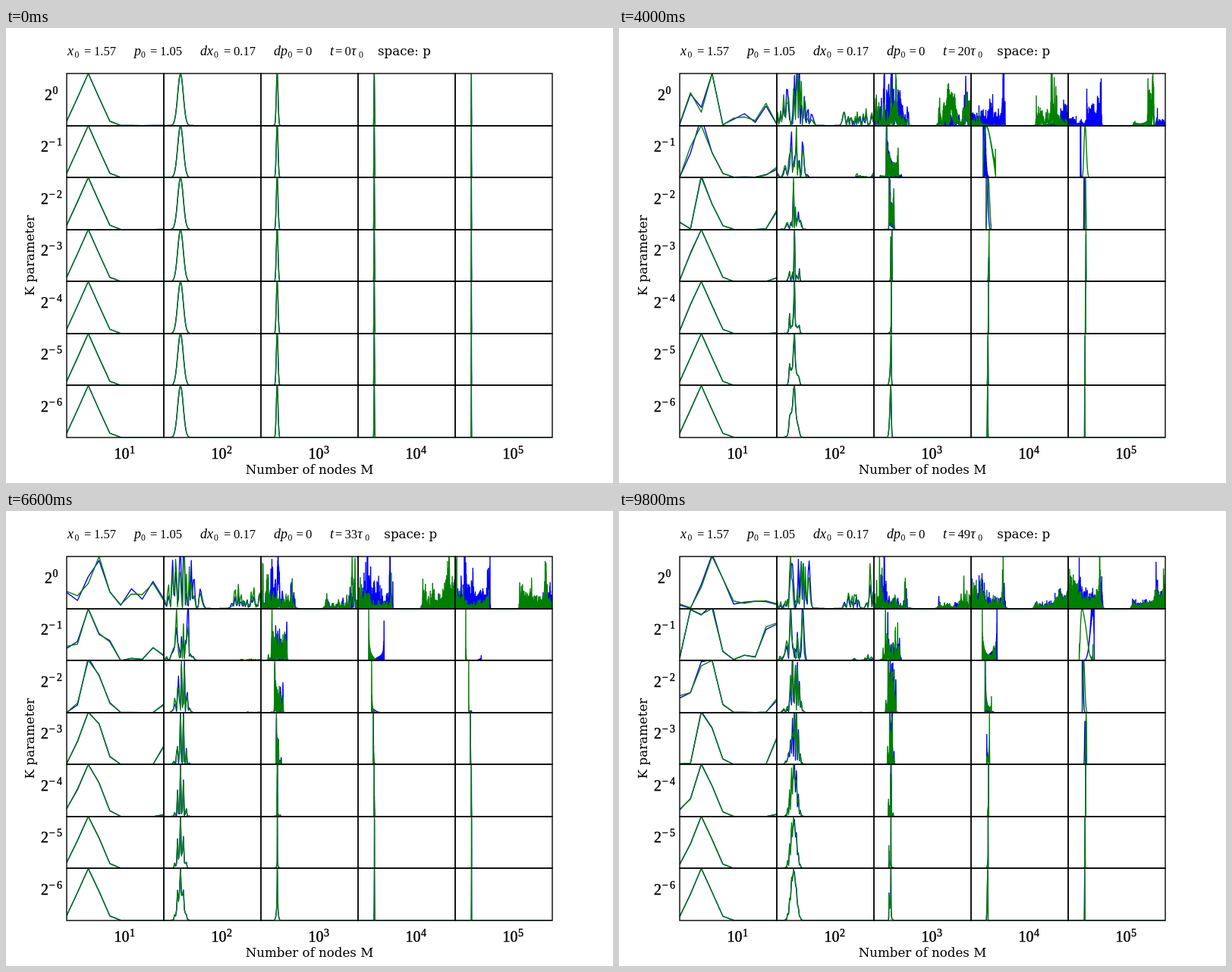
These frames come from a looping animation (800x600 px, 10000 ms). An HTML page with a canvas:

```html
<!DOCTYPE html>
<html lang="en">
<head>
<meta charset="utf-8">
<title>Kicked rotor in momentum space</title>
<style>
  html, body { margin: 0; width: 100%; height: 100%; overflow: hidden; background: #fff; }
  canvas, svg { position: absolute; left: 0; top: 0; width: 800px; height: 600px; }
  text { white-space: pre; }
  .label { font: 16.67px "DejaVu Serif", "Noto Serif", serif; }
  .math { font: 16.67px "Liberation Serif", "Times New Roman", serif; }
  .tick { font: 20px "Liberation Serif", "Times New Roman", serif; stroke: #000; stroke-width: .4px; }
  .math .sub { font-size: 11.67px; }
  .tick .sup { font-size: 14px; }
  .math .it { font-style: italic; font-size: 18px; }
</style>
</head>
<body>
<canvas id="plot" width="800" height="600"></canvas>
<svg id="texts" viewBox="0 0 800 600">
  <text class="label" x="400" y="588" text-anchor="middle">Number of nodes M</text>
  <text class="label" transform="translate(37 300) rotate(-90)" text-anchor="middle">K parameter</text>
</svg>
<script>
const STEP_MS = 200, STEPS = 50, ROWS = 7, COLS = 5;
const LEFT = 80, TOP = 60, CELL_W = 128, CELL_H = 480 / ROWS;
const START_X = Math.PI / 2, SHIFT_X = Math.PI / 18;
const TAU = 2 * Math.PI;
const mod = (a, n) => ((a % n) + n) % n;

// ---- labels ----
const svg = document.getElementById("texts");
function addText(cls, parts) {
  const text = document.createElementNS(svg.namespaceURI, "text");
  text.setAttribute("class", cls);
  const spans = parts.map(([x, y, value, kind = ""]) => {
    const span = document.createElementNS(svg.namespaceURI, "tspan");
    span.setAttribute("x", x);
    span.setAttribute("y", y);
    span.setAttribute("class", kind);
    span.textContent = value;
    text.append(span);
    return span;
  });
  svg.append(text);
  return spans;
}
function addQuantity(x, name, subX, equalX, valueX, value) {
  addText("math", [[x, 36, name, "it"], [subX, 38.5, "0", "sub"], [equalX, 36, "="], [valueX, 36, value]]);
}
addQuantity(81, "x", 90.5, 103, 116, "1.57");
addQuantity(169, "p", 178, 190, 203, "1.05");
addQuantity(256, "dx", 274, 287, 300, "0.17");
addQuantity(353, "dp", 371.5, 382.5, 395, "0");
const [, , stepText, tauText, tauSub] = addText("math", [
  [427, 36, "t", "it"], [434, 36, "="], [446.5, 36, "0"], [455, 36, "τ", "it"], [465, 38.5, "0", "sub"]]);
const [spaceText] = addText("label", [[490, 36, "space: p"]]);

for (let r = 0; r < ROWS; r++) {
  const y = 94.5 + r * CELL_H;
  addText("tick", r
    ? [[46, y, "2"], [57, y - 8, "−", "sup"], [67, y - 8, r, "sup"]]
    : [[51, y, "2"], [61.5, y - 8, "0", "sup"]]);
}
for (let c = 0; c < COLS; c++) {
  const x = 142.5 + c * CELL_W;
  addText("tick", [[x, 568, "10"], [x + 20.5, 560.5, c + 1, "sup"]]);
}

// ---- Fourier transforms: natural order -> bit-reversed order and back ----
const twiddles = {};
function twiddle(n) {
  return twiddles[n] ||= {
    c: Float64Array.from({ length: n / 2 }, (_, j) => Math.cos(TAU * j / n)),
    s: Float64Array.from({ length: n / 2 }, (_, j) => Math.sin(TAU * j / n))
  };
}
function toPosition(re, im) {
  const n = re.length, { c, s } = twiddle(n);
  for (let half = n / 2, stride = 1; half >= 1; half /= 2, stride *= 2) {
    for (let base = 0; base < n; base += 2 * half) {
      for (let a = base, k = 0; a < base + half; a++, k += stride) {
        const b = a + half, dr = re[a] - re[b], di = im[a] - im[b];
        re[a] += re[b];
        im[a] += im[b];
        re[b] = dr * c[k] - di * s[k];
        im[b] = dr * s[k] + di * c[k];
      }
    }
  }
}
function toMomentum(re, im) {
  const n = re.length, { c, s } = twiddle(n);
  for (let half = 1, stride = n / 2; half < n; half *= 2, stride /= 2) {
    for (let base = 0; base < n; base += 2 * half) {
      for (let a = base, k = 0; a < base + half; a++, k += stride) {
        const b = a + half;
        const vr = re[b] * c[k] + im[b] * s[k], vi = im[b] * c[k] - re[b] * s[k];
        re[b] = re[a] - vr;
        im[b] = im[a] - vi;
        re[a] += vr;
        im[a] += vi;
      }
    }
  }
}
function bitReversed(n) {
  const order = new Uint32Array(n);
  for (let i = 1; i < n; i++) order[i] = (order[i >> 1] >> 1) | (i & 1 ? n / 2 : 0);
  return order;
}
function multiply(state, factor) {
  const { re, im } = state, { c, s } = factor;
  for (let i = 0; i < re.length; i++) {
    const r = re[i];
    re[i] = r * c[i] - im[i] * s[i];
    im[i] = r * s[i] + im[i] * c[i];
  }
}

// ---- one panel: quantum standard map on a momentum window of size n ----
function makePanel(row, col) {
  const nodes = 10 ** (col + 1), K = 2 ** -row, small = nodes <= 100;
  const wanted = nodes * (0.8 * K ** 1.4 + 4 / Math.sqrt(nodes));
  const n = small ? nodes : 2 ** Math.ceil(Math.log2(Math.min(wanted, 1.02 * nodes * (nodes > 1000 ? 1.3 : 1))));
  const center = small || !row ? 0 : Math.round(nodes * (1 / 6 + 0.08 * K));
  const first = center - n / 2;

  const table = (phase, scale = 1) => {
    const c = new Float64Array(n), s = new Float64Array(n);
    for (let i = 0; i < n; i++) {
      const angle = phase(i);
      c[i] = scale * Math.cos(angle);
      s[i] = scale * Math.sin(angle);
    }
    return { c, s };
  };
  const signed = i => first + mod(i - first, n);
  const drift = table(i => -Math.PI * (signed(i) ** 2 % (2 * nodes)) / nodes);
  const order = small ? null : bitReversed(n);
  const kick = table(i => -K * nodes / TAU * Math.cos(TAU * (order ? order[i] : i) / n), 1 / n);
  const kernel = small && makeKernel(kick);

  const packets = [START_X, START_X + SHIFT_X].map(x0 => {
    const state = { re: new Float64Array(n), im: new Float64Array(n) };
    const p0 = Math.round(nodes / 6), reach = Math.ceil(3 * Math.sqrt(nodes));
    for (let d = -reach; d <= reach; d++) {
      const i = mod(p0 + d, n), amp = Math.exp(-Math.PI * d * d / nodes);
      state.re[i] += amp * Math.cos((p0 + d) * x0);
      state.im[i] -= amp * Math.sin((p0 + d) * x0);
    }
    return state;
  });

  function step(state) {
    if (small) convolve(state, kernel);
    else {
      toPosition(state.re, state.im);
      multiply(state, kick);
      toMomentum(state.re, state.im);
    }
    multiply(state, drift);
  }
  function density({ re, im }) {
    const out = new Float64Array(nodes);
    for (let k = first; k < first + n; k++) {
      const i = mod(k, n);
      out[mod(k, nodes)] += re[i] * re[i] + im[i] * im[i];
    }
    return out;
  }
  return {
    advance: () => packets.forEach(step),
    paths() {
      const curves = packets.map(density);
      const peak = curves[1].reduce((a, b) => Math.max(a, b), 0);
      return curves.map(curve => tracePath(curve, peak, row, col));
    }
  };
}
function makeKernel({ c, s }) {
  const n = c.length, re = new Float64Array(n), im = new Float64Array(n);
  for (let d = 0; d < n; d++) {
    for (let j = 0; j < n; j++) {
      const w = Math.cos(TAU * (d * j % n) / n); // the kick is even in x
      re[d] += c[j] * w;
      im[d] += s[j] * w;
    }
  }
  return { re, im };
}
function convolve(state, kernel) {
  const n = state.re.length, re = new Float64Array(n), im = new Float64Array(n);
  for (let a = 0; a < n; a++) {
    for (let b = 0; b < n; b++) {
      const d = Math.abs(a - b);
      re[a] += kernel.re[d] * state.re[b] - kernel.im[d] * state.im[b];
      im[a] += kernel.re[d] * state.im[b] + kernel.im[d] * state.re[b];
    }
  }
  state.re = re;
  state.im = im;
}

// ---- drawing ----
function tracePath(curve, peak, row, col) {
  const path = new Path2D(), n = curve.length;
  const x0 = LEFT + col * CELL_W, base = TOP + (row + 1) * CELL_H;
  const point = i => path.lineTo(x0 + i * CELL_W / (n - 1), base - Math.min(curve[i] / peak, 20) * CELL_H);
  if (n <= 1000) {
    for (let i = 0; i < n; i++) point(i);
    return path;
  }
  // Dense curves keep only the extremes of every quarter pixel.
  const bins = CELL_W * 4;
  point(0);
  for (let b = 0; b < bins; b++) {
    const from = Math.floor(b * n / bins), to = Math.floor((b + 1) * n / bins);
    let low = from, high = from;
    for (let i = from; i < to; i++) {
      if (curve[i] < curve[low]) low = i;
      if (curve[i] > curve[high]) high = i;
    }
    point(Math.min(low, high));
    if (low !== high) point(Math.max(low, high));
  }
  point(n - 1);
  return path;
}

const ctx = document.getElementById("plot").getContext("2d");
const panels = [];
for (let row = 0; row < ROWS; row++) {
  for (let col = 0; col < COLS; col++) panels.push(makePanel(row, col));
}
const history = [];
function computeNext() {
  if (history.length) panels.forEach(panel => panel.advance());
  history.push(panels.map(panel => panel.paths()));
}

function draw(step) {
  ctx.fillStyle = "#fff";
  ctx.fillRect(0, 0, 800, 600);
  ctx.lineWidth = 1.39;
  history[step].forEach(([blue, green], i) => {
    const row = Math.floor(i / COLS), x = LEFT + (i % COLS) * CELL_W;
    const y = Math.round(TOP + row * CELL_H), h = Math.round(TOP + (row + 1) * CELL_H) - y;
    ctx.save();
    ctx.beginPath();
    ctx.rect(x, y, CELL_W, h);
    ctx.clip();
    ctx.lineJoin = "round";
    ctx.strokeStyle = "#0000ff";
    ctx.stroke(blue);
    ctx.strokeStyle = "#008000";
    ctx.stroke(green);
    ctx.restore();
    ctx.strokeStyle = "#000";
    ctx.strokeRect(x, y, CELL_W, h);
  });
  const extra = step > 9 ? 8.33 : 0;
  stepText.textContent = step;
  tauText.setAttribute("x", 455 + extra);
  tauSub.setAttribute("x", 465 + extra);
  spaceText.setAttribute("x", 490 + extra);
}

let shown = -1;
function tick() {
  const step = Math.floor(performance.now() / STEP_MS) % STEPS;
  while (history.length <= step) computeNext();
  if (step !== shown) draw(shown = step);
  else if (history.length < STEPS) computeNext();
  requestAnimationFrame(tick);
}
tick();
</script>
</body>
</html>
```
